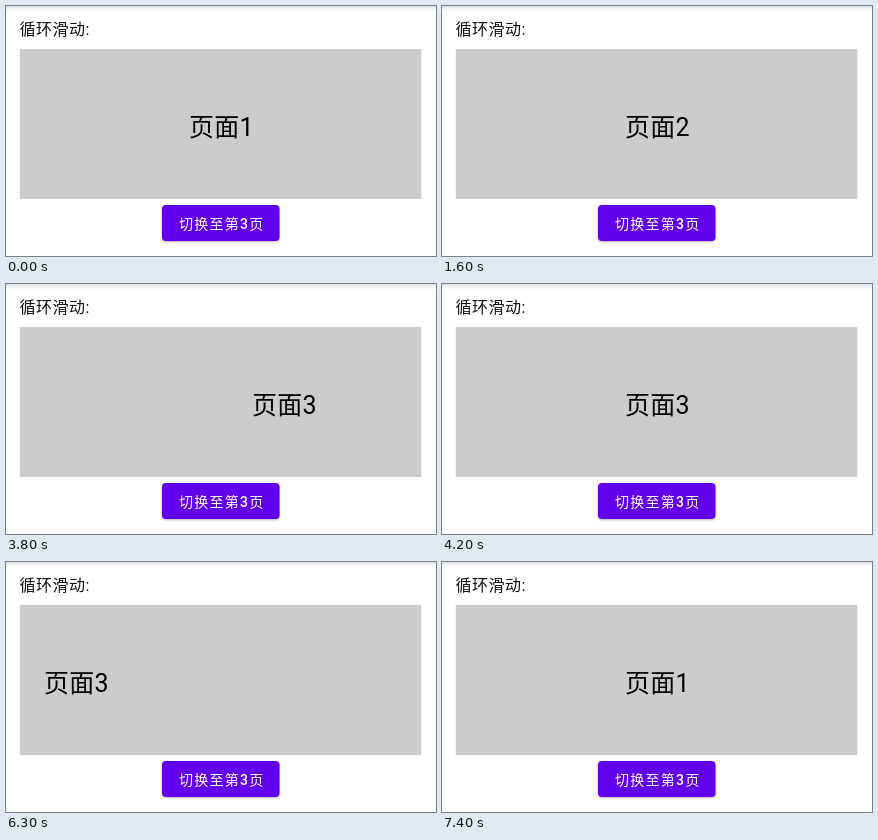
Animation of 430x250 px, one loop 8000 ms. Source, as an HTML page:

```html
<!DOCTYPE html>
<html lang="zh-CN">
<head>
<meta charset="utf-8">
<title>循环滑动</title>
<style>
  html, body { margin: 0; width: 100%; height: 100%; overflow: hidden; background: #fff; }
  svg { display: block; font-family: Roboto, "Noto Sans CJK SC", sans-serif; }
  .label { font-size: 16px; letter-spacing: .5px; fill: #111; }
  .page { font-size: 25px; letter-spacing: .3px; }
  .button { fill: #6200ee; filter: drop-shadow(0 1px 1px rgba(0, 0, 0, .3)); }
  .caption { font-size: 14px; font-weight: 500; letter-spacing: 1.25px; fill: #fff; }
</style>
</head>
<body>
<svg width="430" height="250" viewBox="0 0 430 250">
  <defs>
    <linearGradient id="shade" x2="0" y2="1">
      <stop stop-color="#dedede"/>
      <stop offset=".5" stop-color="#f4f4f4"/>
      <stop offset="1" stop-color="#fff"/>
    </linearGradient>
  </defs>
  <rect width="430" height="6" fill="url(#shade)"/>
  <text class="label" x="13.5" y="28.5">循环滑动:</text>
  <svg x="13.5" y="43" width="402" height="150" overflow="hidden">
    <rect width="402" height="150" fill="#ccc"/>
    <g id="strip"></g>
  </svg>
  <rect class="button" x="156" y="199" width="117.5" height="36" rx="4"/>
  <text class="caption" x="173" y="223">切换至第3页</text>
</svg>
<script>
const LOOP = 8000, STEP = 100, PAGE_WIDTH = 402;
const strip = document.getElementById('strip');

// Each swipe: start time and distance dragged at every step, ending on the next page
const swipes = [
  { start: 900, path: [22, 84, 165, 245, 315, 365, 394, PAGE_WIDTH] },
  { start: 3100, path: [23, 66, 115, 167, 218, 264, 305, 339, 348, 382, 398, PAGE_WIDTH] },
  { start: 5900, path: [1, 22, 58, 100, 145, 188, 225, 254, 275, 318, 350, 373, 388, 396, 400, PAGE_WIDTH] }
];

strip.innerHTML = [1, 2, 3, 1].map((number, i) =>
  `<text class="page" x="${169.5 + i * PAGE_WIDTH}" y="86.5">页面${number}</text>`).join('');

function dragged({ start, path }, time) {
  const step = Math.floor((time - start) / STEP);
  return step < 0 ? 0 : path[Math.min(step, path.length - 1)];
}

function draw(now) {
  const time = now % LOOP;
  const scroll = swipes.reduce((sum, swipe) => sum + dragged(swipe, time), 0);
  strip.setAttribute('transform', `translate(${-scroll})`);
}

const origin = performance.now();
function tick() {
  draw(performance.now() - origin);
  requestAnimationFrame(tick);
}
tick();
</script>
</body>
</html>
```
